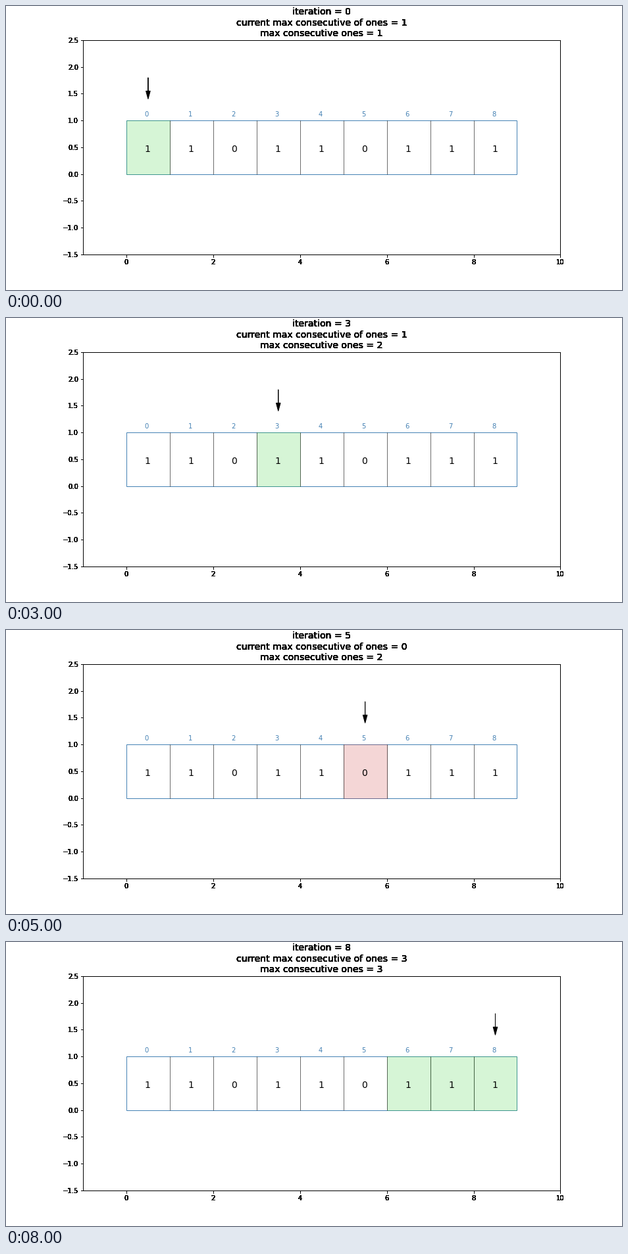
A matplotlib script that plays this animation: 936 px wide and 432 px high, repeating every 9000 ms.

```python
import matplotlib.pyplot as plt
from matplotlib.animation import FuncAnimation
from matplotlib.patches import Rectangle

BITS = [1, 1, 0, 1, 1, 0, 1, 1, 1]
N = len(BITS)
GREEN = "limegreen"
RED = (0.8, 0.2, 0.2)
BLUE = "steelblue"
LAYERS = 10

plt.rcParams["font.family"] = "DejaVu Sans"
fig = plt.figure(figsize=(13, 6), dpi=72, facecolor="white")


def make_axes():
    ax = fig.add_axes([0.125, 0.125, 0.775, 0.755], facecolor="none")
    ax.set_xlim(-1, 10)
    ax.set_ylim(-1.5, 2.5)
    ax.tick_params(labelsize=10)
    return ax


# Stacked identical axes harden the antialiased edges of labels and ticks
layers = [make_axes() for _ in range(LAYERS)]
titles = [ax.set_title("", fontsize=14) for ax in layers]
ax = layers[0]

ax.add_patch(Rectangle((0, 0), N, 1, fill=False, ec=BLUE, lw=1, zorder=0.9))
cells = []
for i, bit in enumerate(BITS):
    cell = Rectangle((i, 0), 1, 1, color=GREEN if bit else RED,
                     alpha=0.2, lw=1, zorder=1)
    cells.append(ax.add_patch(cell))
    if i:
        ax.plot([i, i], [0, 1], color="black", lw=0.57, zorder=2,
                solid_capstyle="butt")
    ax.text(i + 0.42, 0.415, str(bit), fontsize=14)
    ax.text(i + 0.42, 1.075, str(i), fontsize=10, color=BLUE)

arrows = [ax.arrow(i + 0.5, 1.8, 0, -0.25, head_width=0.1, head_length=0.15,
                   fc="black", ec="black") for i in range(N)]


def run_length(i):
    """Number of consecutive ones ending at index i."""
    n = 0
    while n <= i and BITS[i - n]:
        n += 1
    return n


def update(i):
    current = run_length(i)
    best = max(run_length(k) for k in range(i + 1))
    start = i - max(current, 1) + 1
    for k in range(N):
        cells[k].set_visible(start <= k <= i)
        arrows[k].set_visible(k == i)
    text = (f"iteration = {i}\n"
            f"current max consecutive of ones = {current}\n"
            f"max consecutive ones = {best}")
    for title in titles:
        title.set_text(text)
    return [*cells, *arrows, *titles]


anim = FuncAnimation(fig, update, frames=N, interval=1000, repeat=True,
                     repeat_delay=0, blit=False)
plt.show()
```
